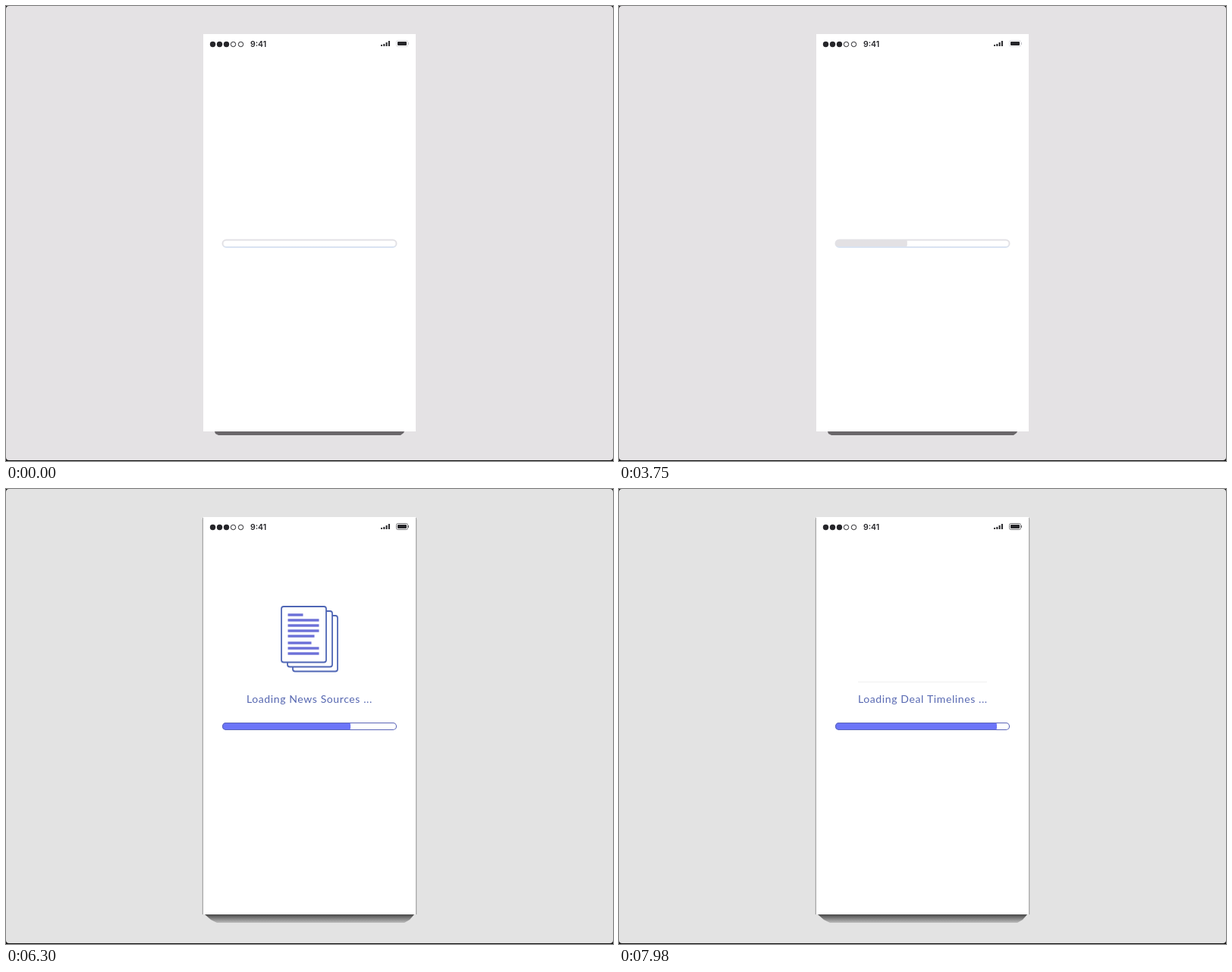
Recreate the animation shown at these times as an HTML page with a canvas. Size 800 by 600 pixels, loop 8000 ms.

```html
<!DOCTYPE html>
<html lang="en">
<head>
<meta charset="utf-8">
<title>Loading</title>
<style>
html, body { margin: 0; width: 100%; height: 100%; overflow: hidden; background: #000; }
canvas { display: block; width: 800px; height: 600px; }
</style>
</head>
<body>
<canvas id="stage" width="800" height="600"></canvas>
<script>
const ctx = document.getElementById('stage').getContext('2d');
const LOOP = 8000;
const VIVID = 4980; // pale colours before, full colours after

const PALE = { bg: '#e4e2e4', edge: '#e2e1e5', fill: '#e3e1e4', page: '#dbe0ef', line: '#e0e0e6' };
const FULL = { bg: '#e3e3e3', edge: '#5b65b8', fill: '#6b74f8', page: '#4f66b5', line: '#6c70d8' };
const BLUE = '#5566b0', GHOST = '#dddde3', INK = '#26262a';

const PROGRESS = [[450, 285], [1740, 322], [3240, 365], [4650, 406], [5490, 432], [6810, 468], [8000, 498.5]];
const ROWS = [['HWUT', '$101.71'], ['ZKOL', '$266.68'], ['QU', '$7.65']];
const LINES = [[12, 20], [19, 41], [26, 41], [33, 41], [40, 35], [49, 31], [56, 41], [63, 41]];
const PAGES = [
  { x: 15, y: 12, enter: 4740, leave: 6541 },
  { x: 8, y: 6, enter: 4560, leave: 6634 },
  { x: 0, y: 0, enter: 4380, leave: 6740 }
];

const clamp = v => Math.max(0, Math.min(1, v));
const ease = u => u < 0.5 ? 2 * u * u : 1 - 2 * (1 - u) * (1 - u);
const ramp = (t, start, length) => ease(clamp((t - start) / length));

function rect(x, y, w, h, color) {
  ctx.fillStyle = color;
  ctx.fillRect(x, y, w, h);
}

function round(x, y, w, h, r, fill, stroke, weight = 1) {
  ctx.beginPath();
  ctx.roundRect(x, y, w, h, r);
  if (fill) { ctx.fillStyle = fill; ctx.fill(); }
  if (stroke) { ctx.strokeStyle = stroke; ctx.lineWidth = weight; ctx.stroke(); }
}

function poly(points, fill) {
  ctx.beginPath();
  points.forEach(([x, y]) => ctx.lineTo(x, y));
  ctx.closePath();
  ctx.fillStyle = fill;
  ctx.fill();
}

function text(str, x, y, font, color, spacing = 0, align = 'left') {
  ctx.font = font;
  ctx.letterSpacing = spacing + 'px';
  ctx.textAlign = align;
  ctx.fillStyle = color;
  ctx.fillText(str, x, y);
}

function drawPhone(vivid, look) {
  rect(0, 0, 800, 600, '#111');
  round(0, 0, 800, 599, 4, look.bg);
  if (vivid) {
    const shade = ctx.createLinearGradient(0, 561, 0, 572);
    shade.addColorStop(0, '#484848');
    shade.addColorStop(1, '#bcbcbc');
    poly([[262, 561], [538, 561], [532, 568], [525, 572], [278, 572], [270, 568]], shade);
    rect(258, 40, 1, 521, '#d2d2d2');
    rect(259, 38, 1, 523, '#a8a8a8');
    rect(540, 38, 1, 523, '#a8a8a8');
    rect(541, 40, 1, 521, '#d2d2d2');
  } else {
    poly([[275, 561], [525, 561], [524, 563], [520, 566], [280, 566], [276, 564]], '#6a676a');
  }
  rect(260, 37, 280, 524, '#fff');
}

function drawStatus(vivid) {
  [272.5, 281.5, 290.5, 299.5, 309.5].forEach((x, i) => {
    ctx.beginPath();
    ctx.arc(x, 50.5, i < 3 ? 3.7 : 3.2, 0, Math.PI * 2);
    if (i < 3) { ctx.fillStyle = INK; ctx.fill(); }
    else { ctx.strokeStyle = INK; ctx.lineWidth = 1; ctx.stroke(); }
  });
  text('9:41', 322, 54, '600 10.5px Inter, sans-serif', INK);
  [2, 3, 5, 7].forEach((h, i) => rect(494 + i * 3.3, 53 - h, 2, h, INK));
  round(514.5, 45.5, 15, 8, 2, null, vivid ? '#77777a' : '#dcdce0');
  round(516, 47, 12, 5, 1, INK);
  rect(530, 48, 1, 3, vivid ? '#77777a' : '#d0d0d4');
}

function progress(t) {
  if (t <= PROGRESS[0][0]) return PROGRESS[0][1];
  const i = PROGRESS.findIndex(p => p[0] > t);
  const [t0, x0] = PROGRESS[i - 1], [t1, x1] = PROGRESS[i];
  return x0 + (x1 - x0) * (t - t0) / (t1 - t0);
}

function drawBar(t, vivid, look) {
  const w = progress(t) - 285;
  if (w > 0) {
    ctx.save();
    ctx.beginPath();
    ctx.roundRect(285, 308, 230, 10, 5);
    ctx.clip();
    round(280, 308, w + 5, 10, 3, look.fill);
    ctx.restore();
  }
  if (vivid) {
    round(285.5, 308.5, 229, 9, 4.5, null, look.edge, 1.1);
  } else {
    const edge = ctx.createLinearGradient(0, 308, 0, 319);
    edge.addColorStop(0.7, look.edge);
    edge.addColorStop(0.9, '#d8e3f3');
    round(285.5, 308.5, 229, 9.5, 4.75, null, edge, 2);
  }
}

// A ghost label is pale and a little heavier.
function label(str, x, y, alpha, ghost, dots) {
  if (alpha <= 0) return;
  const font = '14px Lato, sans-serif';
  ctx.globalAlpha = alpha;
  text(str, x, y, font, ghost ? GHOST : BLUE, 0.6);
  if (ghost) {
    ctx.strokeStyle = GHOST;
    ctx.lineWidth = 0.7;
    ctx.strokeText(str, x, y);
  }
  const end = x + ctx.measureText(str + ' ').width;
  text('...', end, y, font, dots || (ghost ? GHOST : BLUE), 0.6);
  ctx.globalAlpha = 1;
}

function drawPortfolio(t) {
  const leave = 1 - ramp(t, 3330, 270);
  const enter = ramp(t, 1100, 800);
  label('Loading Portfolios', 331, 282 + 20 * (1 - ramp(t, 1100, 500)),
    enter * (1 - ramp(t, 3140, 320)), t > 2900);

  ctx.globalAlpha = ramp(t, 1250, 400) * leave;
  rect(399, 173, 2, 71, '#e1e1e5');
  rect(332, 194.5, 136, 2, '#dde1ea');
  rect(332, 221.5, 136, 2, '#e1e1e5');

  ROWS.forEach(([name, price], i) => {
    const show = ramp(t, 1640 + i * 150, 300);
    const y = 186 + i * 27 + 2 * (1 - show);
    ctx.globalAlpha = show * leave;
    text(name, 333, y, '12px Lato, sans-serif', '#333', 0.3);
    text(price, 467.5, y, '12px Lato, sans-serif', '#333', 0.2, 'right');
  });
  ctx.globalAlpha = 1;
}

function drawPage(page, t, vivid, look) {
  const enter = ramp(t, page.enter, 510);
  const leave = ramp(t, page.leave, 320);
  const alpha = clamp(enter * (vivid ? 1 : 1.8)) * (1 - leave);
  if (alpha < 0.01) return;
  const x = 362 + page.x;
  const y = 154 + page.y + 32 * (1 - enter) + 20 * leave;
  round(x + 1, y + 1, 59, 73.5, 3, '#fff');
  ctx.globalAlpha = alpha;
  round(x + 1, y + 1, 59, 73.5, 3, null, look.page, 1.8);
  LINES.forEach(([dy, w]) => rect(x + 9.5, y + dy - 1.7, w, 3.4, look.line));
  ctx.globalAlpha = 1;
}

function drawNews(t, vivid, look) {
  const enter = ramp(t, 4360, 450);
  const alpha = clamp(enter * 1.2) * (1 - ramp(t, 6430, 320));
  label('Loading News Sources', 317, 282 + 18 * (1 - enter), alpha, !vivid, vivid ? null : '#77777c');
  PAGES.forEach(page => drawPage(page, t, vivid, look));
}

function drawDeals(t) {
  const enter = ramp(t, 7600, 420);
  label('Loading Deal Timelines', 315, 282 + 8 * (1 - enter), enter, false);
  ctx.globalAlpha = ramp(t, 7600, 140);
  rect(315, 254, 170, 1, '#f0f0f0');
  ctx.globalAlpha = 1;
}

function draw(t) {
  const vivid = t >= VIVID;
  const look = vivid ? FULL : PALE;
  drawPhone(vivid, look);
  drawStatus(vivid);
  drawBar(t, vivid, look);
  if (t < 3600) drawPortfolio(t);
  else if (t < 7100) drawNews(t, vivid, look);
  else drawDeals(t);
}

let start;
function tick(now) {
  start ??= now;
  draw((now - start) % LOOP);
  requestAnimationFrame(tick);
}
requestAnimationFrame(tick);
</script>
</body>
</html>
```
